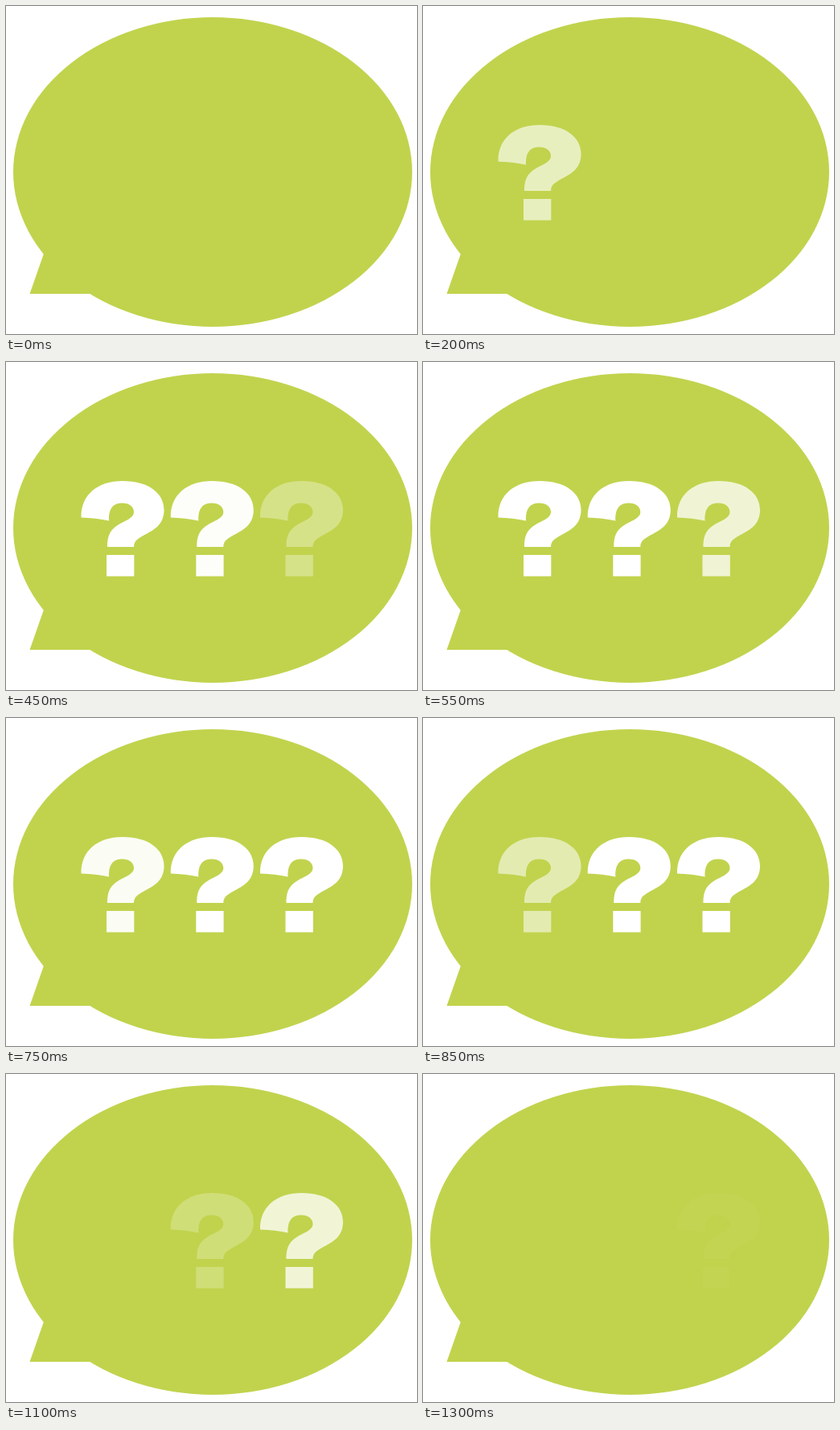
An HTML page for the animation above (1.4 s loop, 511 by 408 pixels).

```html
<!DOCTYPE html>
<html lang="en">
<head>
<meta charset="utf-8">
<title>Speech bubble</title>
<style>
  @property --t {
    syntax: "<number>";
    inherits: true;
    initial-value: 0;
  }
  html, body {
    margin: 0;
    width: 100%;
    height: 100%;
    overflow: hidden;
    background: #fff;
  }
  svg {
    display: block;
    width: 511px;
    height: 408px;
    /* one tick every 50 ms */
    animation: clock 1400ms steps(28, end) infinite;
  }
  @keyframes clock {
    from { --t: 0; }
    to { --t: 1400; }
  }
  .bubble { fill: #c1d34d; }
  .mark {
    fill: #fff;
    opacity: clamp(0, min((var(--t) - var(--in)) / 235, (var(--out) - var(--t)) / 267), 1);
  }
  .first { --in: 50; --out: 1000; }
  .second { --in: 222; --out: 1165; }
  .third { --in: 372; --out: 1306; }
</style>
</head>
<body>
<svg viewBox="0 0 511 408" role="img" aria-label="???">
  <defs>
    <path id="question" d="M93.5 193.5C93 165 114 148 145 148C177 148 196.5 163 196.5 184
      C196.5 200 187 207 176 213C164 219.5 159 222 159 230H126C126 212 132 206 146 199
      C154 195 159 192 159 186.5C159 180 153 175.5 145 175.5C134 175.5 127.5 181 128 197.5
      Q112 194 93.5 193.5ZM125 240H159.3V266.5H125Z"/>
  </defs>
  <g class="bubble">
    <ellipse cx="257" cy="206.5" rx="248" ry="192.5"/>
    <path d="M47 308L29.5 358H106L120 320Z"/>
  </g>
  <use class="mark first" href="#question"/>
  <use class="mark second" href="#question" x="111.3"/>
  <use class="mark third" href="#question" x="222.5"/>
</svg>
</body>
</html>
```
